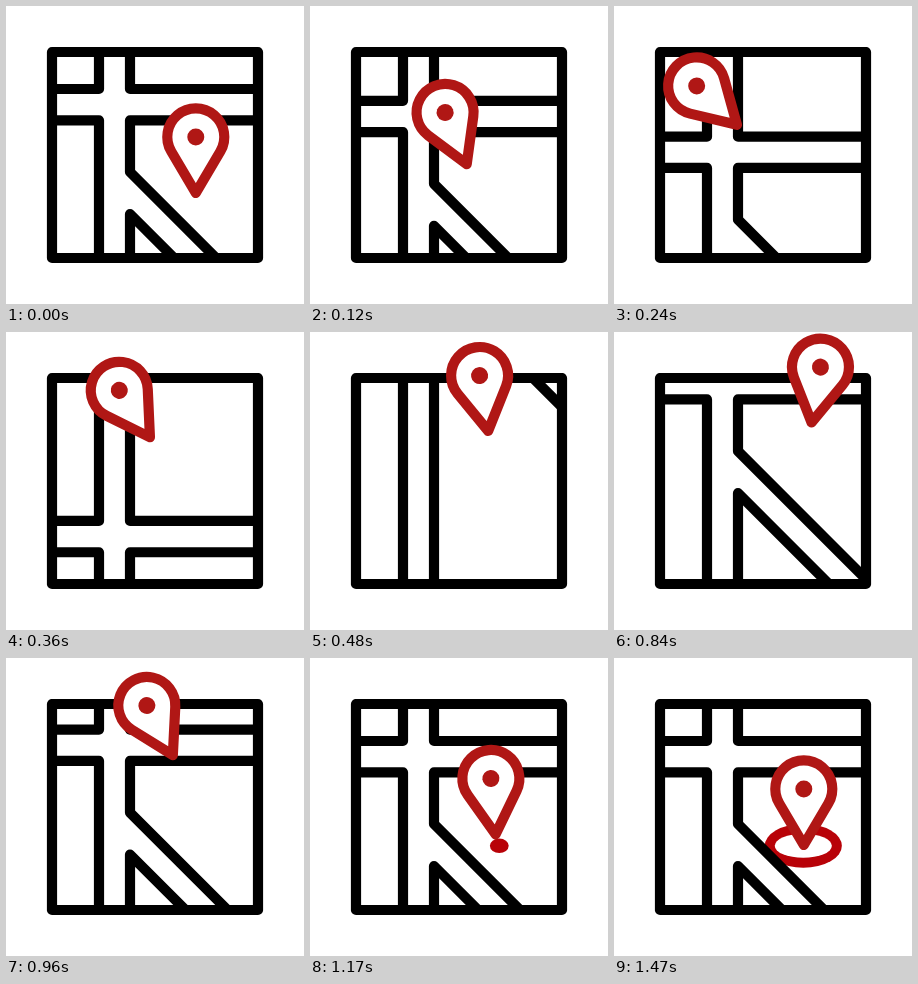
An HTML page that plays this animation: 298 px wide and 298 px high, repeating every 1.5 s.

```html
<!DOCTYPE html>
<html lang="en">
<head>
<meta charset="utf-8">
<title>Map pin</title>
<style>
  html, body { margin: 0; height: 100%; overflow: hidden; background: #fff; }
  svg { display: block; width: 100vw; height: 100vh; }
  path, rect { fill: none; stroke-width: 10.2; stroke-linejoin: round; stroke-linecap: round; }
  .map { stroke: #000; }
</style>
</head>
<body>
<svg viewBox="0 0 298 298">
  <defs>
    <clipPath id="window"><rect x="46" y="46" width="206" height="206"/></clipPath>
    <path id="tile" d="M46 114.3H93V525H46M252 114.3H124V166L260 302M360 444L124 208V525H252"/>
  </defs>
  <ellipse id="ring" cx="189.3" cy="187.8" fill="#b80208"/>
  <ellipse id="hole" cx="189.3" cy="187.8" fill="#fff"/>
  <g class="map">
    <g clip-path="url(#window)">
      <g id="roads">
        <use href="#tile"/><use href="#tile" y="-442"/><use href="#tile" y="-884"/>
      </g>
    </g>
    <rect x="46" y="46" width="206" height="206"/>
  </g>
  <g id="pin">
    <path stroke="#b01715" style="fill:#fff" d="M0 0L-24.5-41.5A28.5 28.5 0 1 1 24.5-41.5Z"/>
    <circle cy="-56" r="8.5" fill="#b01715"/>
  </g>
</svg>
<script>
const LOOP = 1500, SCROLL = 442, HALF_STROKE = 5;
const [ring, hole, roads, pin] =
  ['ring', 'hole', 'roads', 'pin'].map(id => document.getElementById(id));

// time, tip x, tip y, tilt in degrees
const poses = [
  [0, 189.8, 187, 0],
  [240, 123, 119, -46],
  [480, 178, 99, -9],
  [720, 221, 90, 38.5],
  [960, 167, 97, -27.5],
  [1080, 167, 126, -24],
  [1170, 185.5, 176, -5],
  [1260, 189.8, 187, 0]
];

// cubic-bezier(.4, 0, .6, 1) between two times
function ease(t, from, to) {
  const x = Math.min(1, Math.max(0, (t - from) / (to - from)));
  let lo = 0, hi = 1;
  for (let i = 0; i < 24; i++) {
    const u = (lo + hi) / 2;
    if (1.2 * u - 0.6 * u * u + 0.4 * u ** 3 < x) lo = u; else hi = u;
  }
  return lo * lo * (3 - 2 * lo);
}

function slope(i, k) {
  const a = poses[i - 1], b = poses[i + 1];
  return a && b ? (b[k] - a[k]) / (b[0] - a[0]) : 0;
}

// smooth curve through the poses, at rest on both ends
function poseAt(t) {
  t = Math.min(t, poses[poses.length - 1][0]);
  let i = 0;
  while (i < poses.length - 2 && t > poses[i + 1][0]) i++;
  const a = poses[i], b = poses[i + 1], d = b[0] - a[0], u = (t - a[0]) / d, v = 1 - u;
  return [1, 2, 3].map(k =>
    a[k] * v * v * (1 + 2 * u) + b[k] * u * u * (3 - 2 * u) +
    d * u * v * (slope(i, k) * v - slope(i + 1, k) * u));
}

function setRadii(ellipse, rx, ry) {
  ellipse.setAttribute('rx', Math.max(0, rx));
  ellipse.setAttribute('ry', Math.max(0, ry));
}

function draw(now) {
  const t = now % LOOP;
  roads.setAttribute('transform', `translate(0 ${SCROLL * ease(t, 0, 1080)})`);

  const [x, y, tilt] = poseAt(t);
  pin.setAttribute('transform', `translate(${x} ${y}) rotate(${tilt})`);

  const grow = ease(t, 1070, 1480), rx = 33.6 * grow, ry = 17 * grow;
  const edge = grow > 0 ? HALF_STROKE : 0;
  setRadii(ring, rx + edge, ry + edge);
  setRadii(hole, rx - edge, ry - edge);
}

const start = performance.now();
function tick() {
  draw(performance.now() - start);
  requestAnimationFrame(tick);
}
draw(0);
requestAnimationFrame(tick);
</script>
</body>
</html>
```
